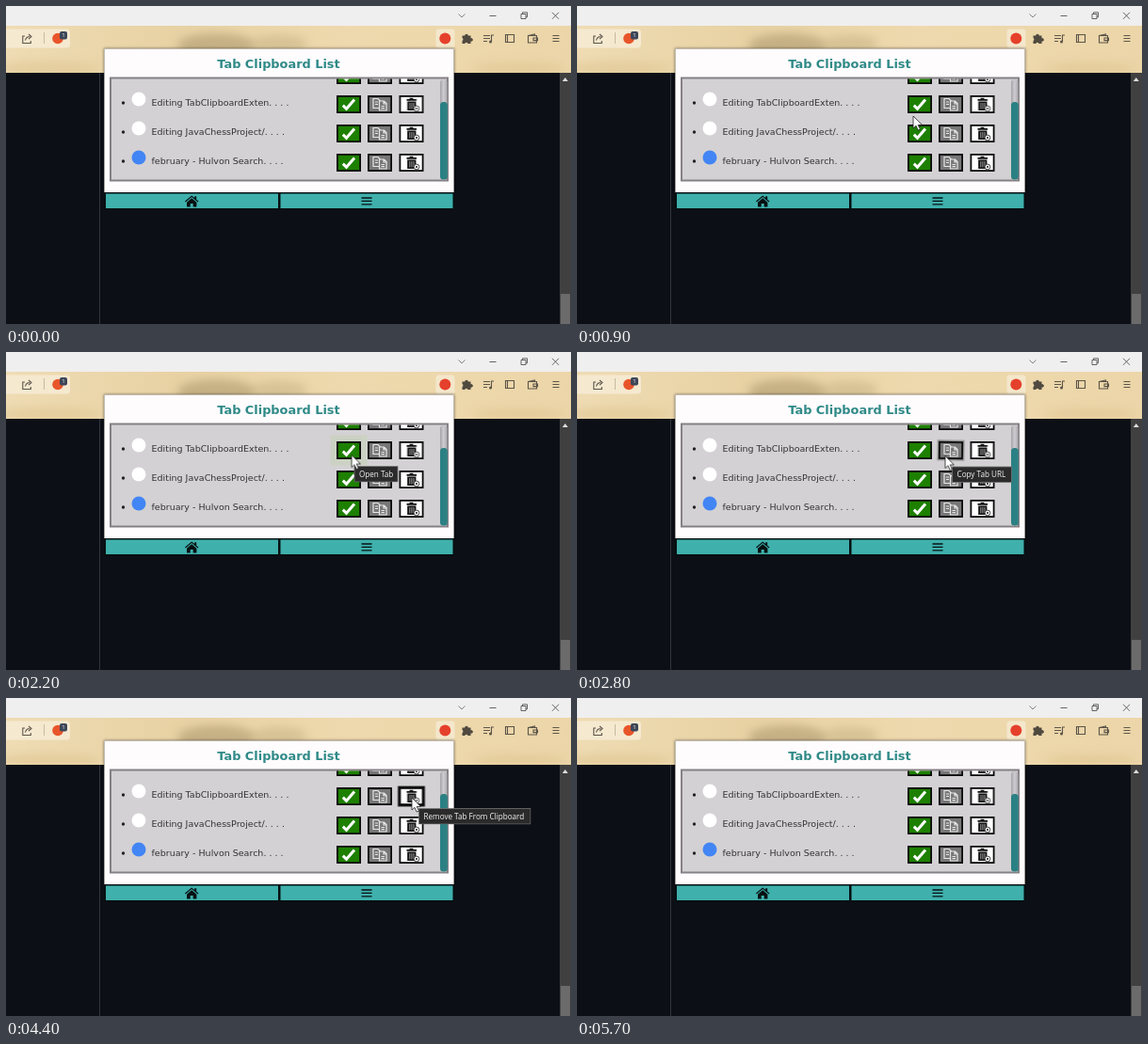
Write an HTML page that moves like this. It is 600 by 338 pixels and loops after 6.6 s.

```html
<!DOCTYPE html>
<html lang="en">
<head>
<meta charset="utf-8">
<title>Tab Clipboard List</title>
<style>
  html, body { margin: 0; width: 100%; height: 100%; overflow: hidden; background: #0c0f16; }
  svg { display: block; width: 100vw; height: 100vh; }
  text { white-space: pre; }
  .title { font: bold 12.9px "DejaVu Sans", sans-serif; fill: #2f8a87; }
  .item { font: 9.5px "DejaVu Sans", sans-serif; fill: #333; }
  .tip text { font: 8.15px "Open Sans", sans-serif; fill: #f4f4f4; }
  .tip rect { fill: #2b2b2b; stroke: #747474; stroke-width: .8; }
  .badge { font: 6px "Open Sans", sans-serif; fill: #fff; text-anchor: middle; }
  .line { fill: none; stroke: #5b5448; stroke-width: 1.1; }
  .win { fill: none; stroke: #555; stroke-width: .9; }
  .btn { transform-box: fill-box; transform-origin: center; }
  .glow { fill: none; stroke-opacity: 0; filter: blur(.7px); }
  .tip, #cursor { opacity: 0; }
</style>
</head>
<body>
<svg id="stage" viewBox="0 0 600 338" xmlns="http://www.w3.org/2000/svg">
  <defs>
    <linearGradient id="paper">
      <stop offset="0" stop-color="#efdcb4"/>
      <stop offset=".3" stop-color="#e8d2a4"/>
      <stop offset=".6" stop-color="#eed9ae"/>
      <stop offset="1" stop-color="#ecd6a9"/>
    </linearGradient>
    <linearGradient id="track">
      <stop offset="0" stop-color="#a5a3a8"/>
      <stop offset=".5" stop-color="#cfcdd1"/>
      <stop offset="1" stop-color="#aaa8ac"/>
    </linearGradient>
    <filter id="soft" x="-50%" y="-50%" width="200%" height="200%"><feGaussianBlur stdDeviation="5"/></filter>
    <filter id="shade" x="-5%" y="-5%" width="110%" height="110%"><feGaussianBlur stdDeviation="1.5"/></filter>
    <clipPath id="bar"><rect y="21" width="600" height="50"/></clipPath>
    <clipPath id="list"><rect x="112" y="77.5" width="356" height="107"/></clipPath>
  </defs>

  <!-- browser window -->
  <rect width="600" height="338" fill="#0c0f16"/>
  <rect width="600" height="21" fill="#f0efef"/>
  <g clip-path="url(#bar)">
    <rect y="21" width="600" height="50" fill="url(#paper)"/>
    <g filter="url(#soft)">
      <ellipse cx="224" cy="42" rx="42" ry="13" fill="#a8946b" opacity=".55"/>
      <ellipse cx="290" cy="40" rx="30" ry="9" fill="#cdb98c" opacity=".7"/>
      <ellipse cx="45" cy="66" rx="55" ry="7" fill="#e2ca98" opacity=".8"/>
      <ellipse cx="545" cy="66" rx="50" ry="6" fill="#e0c793" opacity=".7"/>
    </g>
  </g>
  <path d="M99.5 71V338" stroke="#30343b"/>
  <rect x="588" y="71" width="12" height="267" fill="#404040"/>
  <rect x="589" y="306" width="10" height="32" fill="#6b6b6b"/>
  <path d="M590.8 80l3-4 3 4z" fill="#ddd"/>
  <g class="win">
    <path d="M480.5 8.5l3.5 3.5 3.5-3.5" stroke="#777"/>
    <path d="M513.5 10.5h7M580 6.8l7 7m0-7l-7 7"/>
    <path d="M547 8.5h5v5h-5zM548.5 8.5v-1.7h5v5h-1.5"/>
  </g>

  <!-- address bar and toolbar -->
  <path d="M0 24.5h64q4 0 4 4v12q0 4-4 4H0z" fill="#f5e9d0"/>
  <path d="M40.5 28v12" stroke="#c9bb9d"/>
  <path class="line" d="M20 32h-2.200v7.500h8.500v-2.500M20.500 36.500q.8-4 5-4M24 30l3 2.500-3 2.700"/>
  <circle cx="55" cy="34.500" r="5.800" fill="#e8552a"/>
  <rect x="57" y="27" width="8" height="8.500" rx="2" fill="#3d4658"/>
  <text class="badge" x="61" y="33.400">1</text>
  <rect x="456.500" y="24.500" width="20" height="20" rx="3" fill="#f4e7cb"/>
  <circle cx="466.300" cy="34.500" r="6" fill="#e5402c"/>
  <path d="M484.500 31.500h2.700a1.800 1.800 0 1 1 3.600 0h2.700v2.700a1.800 1.800 0 1 1 0 3.400v2.400h-3a1.700 1.700 0 0 0-3.200 0h-2.800v-3a1.700 1.700 0 0 0 0-3z" fill="#4f493f"/>
  <g class="line">
    <path d="M507 31.500h7M507 34.500h7M507 37.500h4M515.500 38v-7h2.500"/>
    <path d="M530.500 30.500h9v8h-9zM532.500 30.500v8"/>
    <path d="M554.500 31.500h9v7.500h-9zM554.500 31.500l7-1.500v1.500M560 34h4.500v2.600H560z"/>
    <path d="M580.500 31.500h7M580.500 34.500h7M580.500 37.500h7"/>
  </g>
  <circle cx="514.500" cy="38" r="1.500" fill="#5b5448"/>

  <!-- popup -->
  <rect x="104" y="45" width="372" height="153" fill="#000" opacity=".5" filter="url(#shade)"/>
  <rect x="104.500" y="45.500" width="371" height="153" fill="#fffcfe" stroke="#b9b3a8" stroke-width=".6"/>
  <text class="title" x="224.300" y="65.500">Tab Clipboard List</text>
  <rect x="111" y="76.500" width="358" height="109" fill="#d3d1d3" stroke="#858085" stroke-width="2"/>
  <rect x="461" y="78" width="7.500" height="106.500" rx="3.500" fill="url(#track)"/>
  <rect x="461" y="102" width="7.800" height="82.500" rx="3.500" fill="#2a8083"/>
  <rect x="104" y="198" width="372" height="18.500" fill="#071012"/>
  <rect x="106" y="199.500" width="183" height="15.500" fill="#3fb0ac"/>
  <rect x="291.500" y="199.500" width="183" height="15.500" fill="#3fb0ac"/>
  <path d="M190 207.600l7.200-6.200 3 2.600v-1.800h2v3.500l2.300 1.900-.8 1-6.500-5.500-6.400 5.500z" fill="#071012"/>
  <path d="M192 208.700l5.200-4.400 5.200 4.400v4.800h-3.700v-3.400h-3v3.400H192z" fill="#071012"/>
  <path d="M377.500 204h11M377.500 207.400h11M377.500 210.800h11" stroke="#071012" stroke-width="1.300"/>

  <g id="rows" clip-path="url(#list)"></g>
  <g id="tips"></g>
  <path id="cursor" d="M0 0V13l3-2.700 2.200 4.800 2.200-1-2.200-4.600 4.200-.2z" fill="#fff" stroke="#222" stroke-width=".8"/>
</svg>

<script>
const LOOP = 6600;
const $ = id => document.getElementById(id);

const icons = {
  open: '<path d="M6.800 10.700l3.700 3.600L19 4.500" fill="none" stroke="#fff" stroke-width="3"/>',
  copy: `<g fill="#777" stroke="#e6e6e6" stroke-width="1.200">
    <path d="M6 3.500h5l2.500 2.500v7.500H6zM8 7h3M8 9.500h3"/>
    <path d="M12.500 6h5l2.500 2.500v7.500h-7.500zM17 6v3h3M14.500 11.500h3.500M14.500 13.700h3.500"/></g>`,
  remove: `<path d="M8 4h3V2.700h4V4h3.500v1.700H8zM8.700 6.500h9.200V16H8.700z" fill="#111"/>
    <path d="M11.300 8v6.500M13.400 8v6.500M15.500 8v6.500" stroke="#ddd" stroke-width=".7"/>
    <circle cx="18.500" cy="14" r="2.900" fill="#fff" stroke="#222" stroke-width=".8"/>
    <path d="M17.300 12.800l2.400 2.400m0-2.400l-2.400 2.400" stroke="#222" stroke-width=".8"/>`
};

const buttons = [
  { name: 'open', x: 351, fill: '#1d8000', glow: '#98d45c' },
  { name: 'copy', x: 384, fill: '#777', glow: '#777' },
  { name: 'remove', x: 417.5, fill: '#fff', glow: '#000' }
];

const items = [
  { y: 64 },
  { y: 95, label: 'Editing TabClipboardExten. . . .', mark: '#fff' },
  { y: 126, label: 'Editing JavaChessProject/. . . .', mark: '#fff' },
  { y: 157, label: 'february - Hulvon Search. . . .', mark: '#4285f4' }
];

const drawButton = (b, live) => `<g transform="translate(${b.x} 0)">
  <g class="btn" ${live ? `id="${b.name}"` : ''}>
    ${live ? `<rect class="glow" width="26" height="19" stroke="${b.glow}"/>` : ''}
    <rect x=".9" y=".9" width="24.200" height="17.200" fill="${b.fill}" stroke="#0a0a0a" stroke-width="1.800"/>
    ${icons[b.name]}
  </g></g>`;

$('rows').innerHTML = items.map((it, i) => `<g transform="translate(0 ${it.y})">
  ${it.label ? `<circle cx="124.500" cy="8" r="1.700" fill="#222"/>
  <circle cx="141" cy="4" r="7.500" fill="${it.mark}"/>
  <text class="item" x="154.500" y="10.700">${it.label}</text>` : ''}
  ${buttons.map(b => drawButton(b, i === 1)).join('')}</g>`).join('');

// label, x, y, width, shown from, shown until
const tips = [
  ['Open Tab', 370, 121.5, 46, 1400, 2300],
  ['Copy Tab URL', 398.5, 122, 63, 2800, 3800],
  ['Remove Tab From Clipboard', 438.5, 117.5, 118.5, 4400, 5500]
];

$('tips').innerHTML = tips.map(([label, x, y, w]) =>
  `<g class="tip" transform="translate(${x} ${y})">
    <rect width="${w}" height="16.500"/><text x="5" y="11.200">${label}</text></g>`).join('');

// rows: [ms, properties]; the first and last pose are held to the loop ends
function play(el, rows, easing = 'linear') {
  const full = [[0, rows[0][1]], ...rows, [LOOP, rows[rows.length - 1][1]]];
  el.animate(full.map(([ms, pose]) => ({ ...pose, offset: ms / LOOP, easing })),
    { duration: LOOP, iterations: Infinity });
}

const show = (el, from, to) =>
  play(el, [[0, { opacity: 0 }], [from, { opacity: 1 }], [to, { opacity: 0 }]], 'step-end');

// ms, spread, alpha
const glow = (name, steps) => play($(name).querySelector('.glow'),
  steps.map(([ms, spread, alpha]) => [ms, { strokeWidth: spread * 2 + 'px', strokeOpacity: alpha }]));

const tilt = (name, steps) => play($(name),
  steps.map(([ms, deg]) => [ms, { transform: `rotate(${deg}deg)` }]));

[...document.querySelectorAll('.tip')].forEach((el, i) => show(el, tips[i][4], tips[i][5]));

glow('open', [[1100, 0, 0], [1300, 1, .9], [1700, 4.3, .8], [2000, 6, .3], [2200, 6.5, .13], [2350, 7, 0]]);
tilt('open', [[1200, 0], [1450, 3], [1700, -3], [1950, 2], [2150, 0]]);
glow('copy', [[2600, 0, 0], [2750, 1, .8], [3100, 4, .4], [3500, 5, .1], [3800, 5, .1], [3900, 6, 0]]);
tilt('copy', [[2700, 0], [2900, 2], [3150, -2], [3400, 0]]);
glow('remove', [[4200, 0, 0], [4350, 1.2, .9], [4450, 1.6, .9], [4800, 4.3, .5], [5100, 6, .12], [5200, 6.5, 0]]);
tilt('remove', [[4450, 0], [4650, 2], [4900, -3], [5100, 1], [5300, 0]]);

const path = [
  [600, 350, 150], [900, 357, 117], [1200, 361, 110], [1700, 362, 109.5],
  [2200, 367, 109.5], [2350, 373, 110], [2700, 391, 110.5], [3750, 391, 110.5],
  [4200, 431, 106], [5500, 431, 106]
];
play($('cursor'), path.map(([ms, x, y]) => [ms, { transform: `translate(${x}px, ${y}px)` }]));
show($('cursor'), 600, 5500);
</script>
</body>
</html>
```
